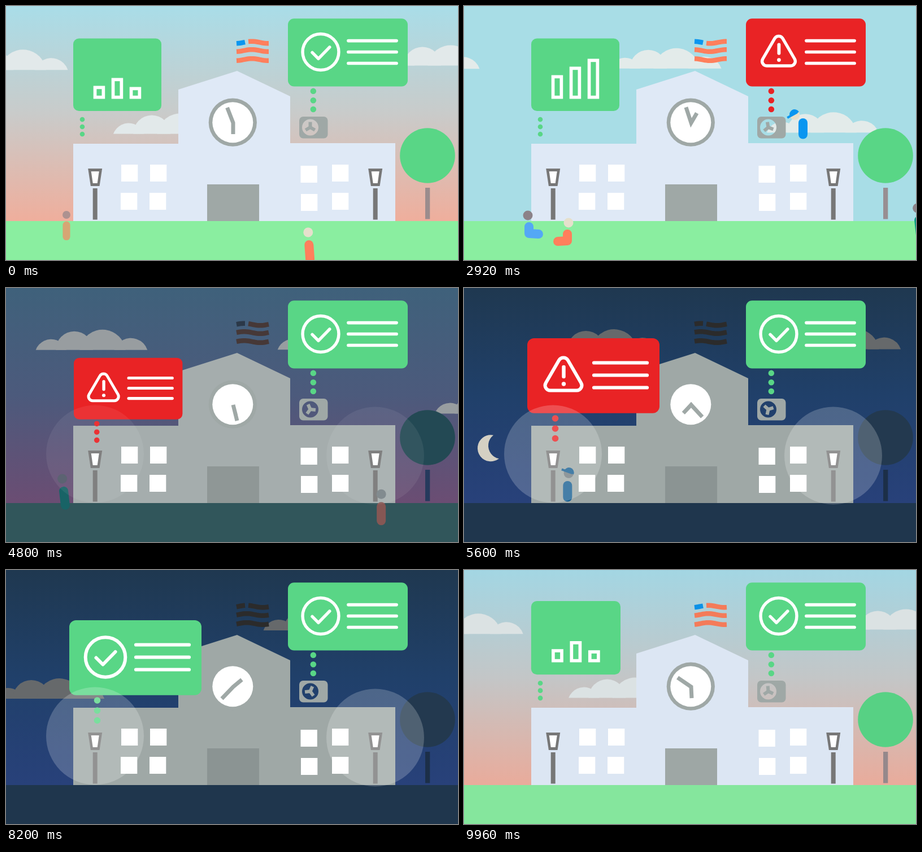
An HTML page with a canvas for the animation above (10000 ms loop, 800x450 px).

```html
<!DOCTYPE html>
<html lang="en">
<head>
<meta charset="utf-8">
<title>Campus day and night</title>
<style>
  html, body { margin: 0; width: 100%; height: 100%; overflow: hidden; }
  canvas { display: block; }
</style>
</head>
<body>
<canvas id="stage" width="800" height="450"></canvas>
<script>
const c = document.getElementById('stage').getContext('2d');
const LOOP = 10000, TAU = Math.PI * 2, RAD = Math.PI / 180;
const GREEN = '#59d686', RED = '#e92325', GREY = '#9fa8a6', CORAL = '#ff7f5c', BLUE = '#0a96f0';
const PALE = '#e6e0cc', BROWN = '#8c8288', NIGHT = '#1f364d';

// columns: sky top, middle, bottom, ground, wall, door, cloud, tree, trunk, stripe, canton
const palette = text => text.split(' ').map(h => '#' + h);
const dawn = palette('a9dde8 c9cbca efae9c 8aeea0 dfe9f6 9fa8a6 e2e9ea 59d686 9b8c8d ff7f5c 0a96f0');
const day = palette('a8dde6 a8dde6 a8dde6 8aeea0 dfe9f6 9fa8a6 e3ebea 59d686 988e92 ff7f5c 0a96f0');
const dusk = palette('6c9ab8 8a7f95 c85f68 4a826e adb4b8 959c9b dfe5ea 23605a 33497a 6b4a48 2c4a70');
const night = palette('1f3850 20406a 28417a 1f364d 9fa8a6 8b9493 66696b 23394f 1c2f48 2b2b2b 2b2b2b');
const daybreak = palette('3c5e86 50648a 7a6a88 2a4d5c abb3b9 8d9696 5f6468 2f6c62 2c4468 2b2b2b 2b2b2b');
const moods = [[0, dawn], [1500, day], [3160, day], [4240, dusk], [5200, night],
  [8360, night], [9240, daybreak], [LOOP, dawn]];

const clamp = v => Math.max(0, Math.min(1, v));
const ramp = (t, a, b) => clamp((t - a) / (b - a));
const window2 = (t, a, b, d) => Math.min(ramp(t, a, a + d), 1 - ramp(t, b - d, b));

function mix(a, b, p) {
  const part = (h, i) => parseInt(h.slice(i, i + 2), 16);
  return '#' + [1, 3, 5].map(i =>
    Math.round(part(a, i) * (1 - p) + part(b, i) * p).toString(16).padStart(2, '0')).join('');
}

// linear interpolation along [[time, ...values], ...]
function along(keys, t) {
  let i = 0;
  while (i < keys.length - 2 && t >= keys[i + 1][0]) i++;
  const a = keys[i], b = keys[i + 1], p = ramp(t, a[0], b[0]);
  return a.slice(1).map((v, n) => v + (b[n + 1] - v) * p);
}

function colorsAt(t) {
  let i = 0;
  while (t >= moods[i + 1][0]) i++;
  const [ta, a] = moods[i], [tb, b] = moods[i + 1];
  return a.map((h, n) => mix(h, b[n], ramp(t, ta, tb)));
}

function popIn(t, start, end) {
  const p = ramp(t, start, start + 400) - 1;
  const grow = t < start ? 0 : 1 + 2.7 * p ** 3 + 1.7 * p ** 2;
  return grow * (1 - ramp(t, end - 300, end) ** 2);
}

function rect(x, y, w, h, color) { c.fillStyle = color; c.fillRect(x, y, w, h); }
function disc(x, y, r, color) {
  c.fillStyle = color; c.beginPath(); c.arc(x, y, r, 0, TAU); c.fill();
}
function poly(points, color) {
  c.fillStyle = color; c.beginPath();
  points.forEach(p => c.lineTo(...p));
  c.fill();
}
function line(points, width, color, cap = 'round') {
  c.strokeStyle = color; c.lineWidth = width; c.lineCap = cap;
  c.lineJoin = cap === 'round' ? 'round' : 'miter';
  c.beginPath();
  points.forEach(p => c.lineTo(...p));
  c.stroke();
}
function panel(x, y, w, h, r, color) {
  c.fillStyle = color; c.beginPath(); c.roundRect(x, y, w, h, r); c.fill();
}
function at(x, y, draw, scale = 1, turn = 0) {
  c.save(); c.translate(x, y); c.rotate(turn); c.scale(scale, scale); draw(); c.restore();
}

function sky(colors) {
  const g = c.createLinearGradient(0, 0, 0, 381);
  colors.slice(0, 3).forEach((h, i) => g.addColorStop(i / 2, h));
  rect(0, 0, 800, 450, g);
}

function clouds(t, color) {
  c.fillStyle = color;
  for (const [start, base] of [[110, 114], [867, 111.5], [388, 229.3]]) {
    const right = (start + t * 0.1185) % 1185, y = base - right * 0.007;
    for (const [x, drop, r] of [[27, 10, 29], [68, 0, 33], [118, 5, 41], [168, 10, 31]]) {
      const a = Math.asin(drop / r);
      c.beginPath();
      c.arc(right - 198 + x, y + drop, r, Math.PI + a, TAU - a);
      c.fill();
    }
  }
}

function moon(t) {
  const a = (74.6 + 0.0416 * (t - 6960)) * RAD;
  if (t < 5000) return;
  const dist = Math.hypot(19, 4.5), aim = Math.atan2(-4.5, 19), r = 23.5;
  const half = Math.acos(dist / 2 / r);
  at(404 - 375 * Math.cos(a), 400 - 375 * Math.sin(a), () => {
    c.globalAlpha = Math.min(ramp(t, 5200, 5700), 1 - ramp(t, 8900, 10000) * 0.6);
    c.fillStyle = '#fff3d8';
    c.beginPath();
    c.arc(0, 0, r, aim + half, aim - half + TAU);
    c.arc(19, -4.5, r, aim + Math.PI + half, aim + Math.PI - half, true);
    c.fill();
  });
}

function flag(t, stripe, canton) {
  const wave = (x0, x1, y, color) => {
    const pts = [];
    for (let x = x0; x <= x1; x += 3)
      pts.push([x, y - 1.8 * Math.cos((x - 435) * 0.11 - t / LOOP * 12 * TAU)]);
    line(pts, 8.5, color, 'butt');
  };
  wave(408, 425, 64.5, canton);
  wave(429, 465, 64.5, stripe);
  wave(408, 465, 79, stripe);
  wave(408, 465, 95, stripe);
}

function fanUnit(t) {
  c.fillStyle = GREY;
  c.beginPath();
  c.roundRect(519, 196, 50.5, 38.5, 7);
  c.moveTo(553, 215);
  c.arc(538.5, 215, 14.5, 0, TAU);
  c.fill('evenodd');
  for (let i = 0; i < 3; i++)
    at(538.5, 215, () => line([[0, 0], [0, -9.5]], 6, GREY, 'butt'), 1, i * TAU / 3 + t * 0.12 * RAD);
}

function building(t, wall, door) {
  poly([[119, 244], [305, 244], [305, 148], [409, 115], [503, 160],
    [503, 243], [689, 243], [689, 381], [119, 381]], wall);
  rect(356, 316, 92, 65, door);
  for (const [x, y] of [[204, 281], [255, 281], [203, 331], [254, 331],
    [521.5, 283], [577, 281], [522, 333], [577, 331]]) rect(x, y, 29.3, 30, '#fff');
  disc(401.3, 206.2, 42.6, GREY);
  disc(401.3, 206.2, 36, '#fff');
  const hand = (deg, len) => [402 + len * Math.sin(deg * RAD), 207 - len * Math.cos(deg * RAD)];
  line([hand(338 + t * 0.864, 29), [402, 207], hand(180 + t * 0.072, 20)], 7, GREY, 'butt');
}

function lamp(x) {
  rect(x - 4, 323, 8, 55.5, '#777');
  poly([[x - 12.5, 288], [x + 12.5, 288], [x + 7.8, 319], [x - 7.8, 319]], '#777');
  poly([[x - 7, 293], [x + 7, 293], [x + 4, 314], [x - 4, 314]], '#fff');
}

const people = [
  { skin: BROWN, coat: CORAL, size: 0.82, alpha: 0.65, path: [[0, 107, 370], [200, 107, 370]] },
  { skin: PALE, coat: CORAL, seat: [1500, 3450, -1],
    path: [[0, 535, 401], [1500, 185, 384], [3450, 185, 384], [4240, 465, 372], [5240, 820, 360]] },
  { skin: BROWN, coat: '#54a8f5', seat: [1300, 3300, 1],
    path: [[300, -20, 380], [1300, 113, 371], [3300, 113, 371], [4200, -20, 380]] },
  { skin: BROWN, coat: '#0f9a84',
    path: [[2800, 848, 360], [2920, 803, 358], [4240, 310, 338], [5120, -20, 338]] }
];

function person({ skin, coat, size = 1, alpha = 1, seat, path }, t, dark) {
  if (t < path[0][0] || t > path[path.length - 1][0]) return;
  const [x, y] = along(path, t), dx = along(path, t + 20)[0] - x;
  const sits = seat && t >= seat[0] && t < seat[1];
  at(x, y, () => {
    c.globalAlpha = alpha;
    disc(0, 0, 8.5, mix(skin, NIGHT, dark));
    const s = sits ? seat[2] : 0;
    const body = sits ? [[s * 2, 20], [s * 2, 32], [s * 19, 33]] : [[0, 22], [0, 47]];
    line(body, 16, mix(coat, NIGHT, dark));
  }, size, sits ? 0 : Math.min(0, dx) * 0.015);
}

function mechanic(x, y, headX, headY, tilt, dark) {
  const blue = mix(BLUE, NIGHT, dark);
  line([[x, y], [x, y + 20.5]], 16, blue);
  at(x + headX, y + headY, () => {
    disc(0, 0, 8.8, mix(PALE, NIGHT, dark));
    c.fillStyle = blue;
    c.beginPath(); c.arc(0, -1, 9, Math.PI, TAU); c.fill();
    line([[-14, -2], [6, -2]], 4, blue, 'butt');
  }, 1, tilt);
}

function dots(x, ys, r, color) { ys.forEach(y => disc(x, y, r, color)); }

function notice(x, y, scale, bad, pop = 1) {
  if (pop <= 0) return;
  const color = mix(GREEN, RED, bad);
  at(x + 45 * scale, y + 195 * scale, () => {
    c.translate(-45, -195);
    panel(0, 0, 234, 132.7, 12, color);
    dots(49.5, [142, 160, 177.5], 5.8, color);
    [43.5, 65.5, 87.5].forEach(v => line([[118, v], [212, v]], 6.2, '#fff'));
    c.globalAlpha = 1 - bad;
    c.beginPath(); c.arc(64, 65.5, 35.3, 0, TAU); c.lineWidth = 6; c.stroke();
    line([[47.5, 66.5], [59.5, 78.5], [81.5, 56]], 6, '#fff');
    c.globalAlpha = bad;
    c.beginPath();
    c.moveTo(64, 92.5);
    c.arcTo(25, 92.5, 64, 25.5, 9);
    c.arcTo(64, 25.5, 103, 92.5, 9);
    c.arcTo(103, 92.5, 64, 92.5, 9);
    c.closePath();
    c.stroke();
    line([[64.5, 51], [64.5, 68]], 6.5, '#fff');
    disc(64.5, 81, 3.7, '#fff');
  }, scale * pop);
}

function chart(t) {
  const pop = t > 5000 ? popIn(t, 9600, 20000) : popIn(t, -1000, 4328);
  if (pop <= 0) return;
  const heights = along([[0, 23, 37, 21], [2920, 42, 57, 71], [4240, 52, 54, 82]], t > 5000 ? 0 : t);
  at(130, 237, () => {
    c.translate(-130, -237);
    panel(119, 57.5, 156, 128.5, 10, GREEN);
    dots(135, [201, 214, 227], 4.3, GREEN);
    const edge = 5.7 / pop;
    heights.forEach((h, i) => {
      const x = 154.7 + i * 32, w = 20.5 - 2 * edge;
      rect(x, 164.5 - h, 20.5, h, '#fff');
      if (w > 0) rect(x + edge, 164.5 - h + edge, w, h - 2 * edge, GREEN);
    });
  }, pop);
}

function draw(now) {
  const t = now % LOOP, colors = colorsAt(t);
  const [, , , ground, wall, door, cloud, tree, trunk, stripe, canton] = colors;
  const dark = along([[0, 0], [3160, 0], [4240, 0.5], [5200, 0.58]], t)[0];

  sky(colors);
  clouds(t, cloud);
  moon(t);
  flag(t, stripe, canton);
  fanUnit(t);
  const rise = window2(t, 2300, 3600, 300);
  if (rise > 0) mechanic(600, 207 + 70 * (1 - rise), -14.5, -14, -0.5, 0);
  building(t, wall, door);
  rect(742, 322, 8.3, 55.5, trunk);
  disc(746, 265, 48.8, tree);
  rect(0, 381, 800, 69, ground);
  lamp(157.7);
  lamp(653.7);
  people.forEach(p => person(p, t, dark));
  if (t > 4900 && t < 6800) {
    const [x, y] = along([[4900, -20, 385], [5450, 183.3, 350], [6200, 183.3, 350], [6800, -20, 385]], t);
    mechanic(x, y, 2, -22, 0.35, dark);
  }

  notice(499, 22.2, 0.906, window2(t, 1900, 3400, 160));
  chart(t);
  notice(112, 89, 1, 1 - ramp(t, 6200, 6360), popIn(t, 4700, 8700));

  const glow = 0.2 * window2(t, 4700, 9700, 300);
  if (glow > 0) {
    c.globalAlpha = glow;
    disc(157.5, 294, 86.5, '#fff');
    disc(653.5, 297, 86.5, '#fff');
    c.globalAlpha = 1;
  }
}

const begin = performance.now();
(function tick() {
  draw(performance.now() - begin);
  requestAnimationFrame(tick);
})();
</script>
</body>
</html>
```
